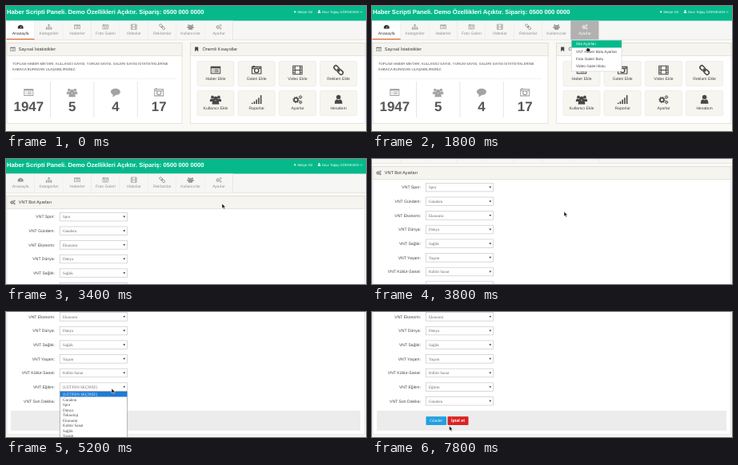
Recreate the animation shown at these times as an HTML page. Size 450 by 157 pixels, loop 8 s.

```html
<!DOCTYPE html>
<html lang="tr">
<head>
<meta charset="utf-8">
<title>Haber Paneli</title>
<style>
html, body { margin: 0; width: 100%; height: 100%; overflow: hidden; background: #fff; }
svg { display: block; }
#stage { width: 100vw; height: 100vh; }
text { font-family: "Liberation Sans", Arial, sans-serif; fill: currentColor; text-rendering: geometricPrecision; white-space: pre; }
.serif { font-family: "Liberation Serif", Times, serif; }
.bold { font-weight: bold; }
.tab { color: #949494; }
.tab .back { fill: #f6f6f5; }
.tab .underline { fill: none; }
.tab.active { color: #333; }
.tab.active .back { fill: #fff; }
.tab.active .underline { fill: #dc6b3c; }
.tab.hover { color: #fff; }
.tab.hover .back { fill: #b1b1b1; }
.row rect { fill: none; }
.row { color: #444; }
.row.on { color: #fff; }
#menu .on rect { fill: #06b98b; }
#list .on rect { fill: #1e7ad6; }
</style>
</head>
<body>
<svg id="stage" viewBox="0 0 450 157" preserveAspectRatio="none"></svg>
<script>
const GREEN = '#06b98b';
const BOT = 'VNT';

// Icons live in a 16 x 16 box and take the current colour.
const line = (d, w = 2) => `<path d="${d}" fill="none" stroke="currentColor" stroke-width="${w}"/>`;
const solid = d => `<path d="${d}" fill="currentColor" fill-rule="evenodd"/>`;
const gear = (x, y, r) => `<g fill="none" stroke="currentColor"><circle cx="${x}" cy="${y}" r="${r}" stroke-width="${r * .7}"/>
  <circle cx="${x}" cy="${y}" r="${r * 1.5}" stroke-width="${r * .5}" stroke-dasharray="${r * .59}"/></g>`;
const person = (x, y, s) => `<g transform="translate(${x} ${y}) scale(${s})" fill="currentColor">
  <circle r="3.2"/><path d="M-5.5 9.5V7Q-5 3.5-2.5 3.2Q0 5 2.5 3.2Q5 3.5 5.5 7V9.5Z"/></g>`;
const icons = {
  gauge: solid('M1 13A7.5 7.5 0 1 1 15 13ZM7 11H9L11 5Z'),
  sitemap: solid('M6 1H10V5H6ZM0 11H4V15H0ZM6 11H10V15H6ZM12 11H16V15H12Z') + line('M8 5V11M2 11V8H14V11', 1.2),
  list: solid('M0 2H16V14H0ZM1.3 5V12.7H14.7V5Z') + line('M3 7H4.5M6 7H13M3 9H4.5M6 9H13M3 11H4.5M6 11H13', 1),
  camera: line('M.7 2.7H15.3V13.8H.7Z', 1.4) + line('M1 5.2H4.8M11.2 5.2H15M2 2H5', 1.8) +
    '<circle cx="8" cy="8.5" r="3.4" fill="none" stroke="currentColor" stroke-width="1.7"/>',
  film: line('M.7 1.2H15.3V14.8H.7ZM4 1V15M12 1V15M4 8H12M1 4.6H4M1 8H4M1 11.4H4M12 4.6H15M12 8H15M12 11.4H15', 1.3),
  link: `<g fill="none" stroke="currentColor" stroke-width="2" transform="rotate(45 8 8)">
    <rect x="-1" y="5" width="9" height="6" rx="3"/><rect x="8" y="5" width="9" height="6" rx="3"/><path d="M5 8H11"/></g>`,
  users: person(3, 4, .75) + person(13, 4, .75) + person(8, 6.2, 1),
  cogs: gear(5.5, 8.5, 3) + gear(12.7, 4, 1.7) + gear(12.7, 12.3, 1.7),
  bars: solid('M0 13H2V15H0ZM3.5 11H5.5V15H3.5ZM7 8H9V15H7ZM10.5 5H12.5V15H10.5ZM14 1H16V15H14Z'),
  user: person(8, 4.3, 1.1),
  comment: solid('M8 1.5C13 1.5 16 4 16 7S13 12.5 8 12.5Q6 15 2.5 15Q4 13 3.5 11.5Q0 10 0 7C0 4 3 1.5 8 1.5Z'),
  bookmark: solid('M3 1H13V15L8 10.5L3 15Z'),
  play: solid('M3 2L14 8L3 14Z')
};

const icon = (name, x, y, size, color = 'currentColor') =>
  `<svg x="${x - size / 2}" y="${y - size / 2}" width="${size}" height="${size}" viewBox="0 0 16 16" overflow="visible" color="${color}">${icons[name]}</svg>`;
const rect = (x, y, w, h, fill, extra = '') =>
  `<rect x="${x}" y="${y}" width="${w}" height="${h}" fill="${fill}" ${extra}/>`;
const text = (s, x, y, size, { color = 'currentColor', anchor = 'start', cls = '' } = {}) =>
  `<text x="${x}" y="${y + size * .35}" font-size="${size}" text-anchor="${anchor}" class="${cls}" color="${color}">${s}</text>`;
const middle = (s, x, y, size, color, cls) => text(s, x, y, size, { color, cls, anchor: 'middle' });
const group = (id, body) => `<g id="${id}">${body}</g>`;

const panel = (x, w, h, iconName, title, iconColor = '#444') =>
  rect(x, 46.5, w, h, '#fff', 'stroke="#dcdbd7" stroke-width=".7"') +
  rect(x, 46.5, w, 16, '#f5f4ef', 'stroke="#dcdbd7" stroke-width=".7"') +
  icon(iconName, x + 7.5, 54.3, 6.5, iconColor) +
  text(title, x + 14.7, 54.3, 5.6, { color: '#3c3c3c' });

const tabs = [['gauge', 'Anasayfa'], ['sitemap', 'Kategoriler'], ['list', 'Haberler'], ['camera', 'Foto Galeri'],
  ['film', 'Videolar'], ['link', 'Reklamlar'], ['users', 'Kullanıcılar'], ['cogs', 'Ayarlar']];

const header =
  rect(0, 0, 450, 18.5, GREEN) +
  text('Haber Scripti Paneli. Demo Özellikleri Açıktır. Sipariş: 0500 000 0000', 1, 7.7, 7.65, { color: '#fff', cls: 'bold' }) +
  icon('play', 361.5, 7.3, 3.6, '#fff') + text('Siteye Git', 364.3, 7.3, 4.3, { color: '#fff' }) +
  icon('user', 391.5, 7, 4.6, '#fff') + text('Onur Toğay GÖRSEVEN', 394.7, 7.3, 4.2, { color: '#fff' }) +
  '<path d="M442.5 6.7L444 8.2L445.5 6.7" fill="none" stroke="#fff" stroke-width=".6"/>' +
  tabs.map(([name, label], i) => {
    const x = .5 + i * 35.4, mid = x + 17.7;
    return `<g class="tab">${rect(x, 18.5, 35.4, 23.7, 'none', 'class="back"')}${rect(x, 41, 35.4, 1.2, 'none', 'class="underline"')}
      ${icon(name, mid, 26.2, 7.5)}${middle(label, mid, 34.1, 5)}</g>` +
      rect(x + 35.1, 18.5, .6, 23.7, '#dedede');
  }).join('');

const stats = [['list', '1947'], ['users', '5'], ['comment', '4'], ['camera', '17']];
const shortcuts = [['list', 'Haber Ekle'], ['camera', 'Galeri Ekle'], ['film', 'Video Ekle'], ['link', 'Reklam Ekle'],
  ['users', 'Kullanıcı Ekle'], ['bars', 'Raporlar'], ['cogs', 'Ayarlar'], ['user', 'Hesabım']];

const home =
  panel(1, 219, 101, 'list', 'Sayısal İstatistikler', '#777') +
  text('TOPLAM HABER MİKTARI, KULLANICI SAYISI, YORUM SAYISI, GALERİ SAYISI İSTATİSTİKLERİNE', 8, 72.3, 4.27, { color: '#555' }) +
  text('KABACA BURADAN ULAŞABİLİRSİNİZ.', 8, 79.8, 4.4, { color: '#555' }) +
  rect(8, 91, 205, .5, '#e4e4e4') +
  stats.map(([name, value], i) => {
    const x = 28.3 + i * 54.3;
    return icon(name, x, 108.5, 12, '#a3a3a3') + middle(value, x, 125.7, 16.9, '#555', 'bold') +
      (i < 3 ? rect(x + 27, 95, .6, 45, '#d5d5d5') : '');
  }).join('') +
  panel(230.7, 218.3, 101, 'bookmark', 'Önemli Kısayollar') +
  shortcuts.map(([name, label], i) => {
    const x = 239 + i % 4 * 51.2, y = i < 4 ? 69.5 : 106.5;
    return rect(x, y, 46, 31, '#f7f5f0', 'rx="1.5" stroke="#e6e4df" stroke-width=".6"') +
      icon(name, x + 23, y + 11, 12.5, '#484848') + middle(label, x + 23, y + 22.2, 5.1, '#444');
  }).join('');

const fields = [['Spor', 'Spor'], ['Gündem', 'Gündem'], ['Ekonomi', 'Ekonomi'], ['Dünya', 'Dünya'], ['Sağlık', 'Sağlık'],
  ['Yaşam', 'Yaşam'], ['Kültür-Sanat', 'Kültür Sanat'], ['Eğitim', ''], ['Son Dakika', 'Gündem']];

const form =
  panel(1, 447.5, 209.5, 'cogs', BOT + ' Bot Ayarları') +
  fields.map(([label, value], i) => {
    const y = 72.6 + i * 17.65;
    return text(`${BOT} ${label}:`, 61, y, 5.1, { color: '#444', anchor: 'end' }) +
      rect(67.3, y - 5.3, 84.2, 10.6, '#fff', 'stroke="#c8c8c8" stroke-width=".7"') +
      (value ? text(value, 71, y, 5, { color: '#666', cls: 'serif' })
        : group('choice', text('[LÜTFEN SEÇİNİZ]', 71, y, 5, { color: '#666', cls: 'serif' }))) +
      `<path d="M146.3 ${y - 1}h3l-1.5 2.2Z" fill="#444"/>`;
  }).join('') +
  rect(6, 226, 437, 25, '#ececec') +
  rect(67.5, 233.2, 25.5, 10.8, '#21a0e0', 'rx=".8"') + middle('Gönder', 80.2, 238.5, 5.3, '#fff', 'serif') +
  rect(94.5, 233.2, 26, 10.8, '#da2222', 'rx=".8"') + middle('İptal et', 107.5, 238.5, 5.3, '#fff', 'bold');

const rows = (labels, x, y, w, pitch, size, indent, cls = '') => labels.map((label, i) =>
  `<g class="row">${rect(x, y + i * pitch, w, pitch, 'none')}${text(label, x + indent, y + (i + .5) * pitch, size, { cls })}</g>`).join('');

const menu = rect(249.5, 42.5, 62.5, 39.5, '#fff', 'stroke="#cfcfcf" stroke-width=".6"') +
  rows(['Site Ayarları', BOT + ' Haber Botu Ayarları', 'Foto Galeri Botu', 'Video Galeri Botu'], 249.5, 43.2, 62.5, 9.15, 4.7, 5.5);

const list = rect(67.3, 99.7, 84.4, 90, '#fff', 'stroke="#999" stroke-width=".7"') +
  rows(['[LÜTFEN SEÇİNİZ]', 'Gündem', 'Spor', 'Dünya', 'Teknoloji', 'Ekonomi', 'Kültür Sanat', 'Sağlık', 'Yaşam'],
    67.6, 100, 83.8, 6.53, 5, 3.5, 'serif');

const outline = 'stroke="#fff" stroke-width=".5" stroke-linejoin="round"';
const cursor =
  `<path id="arrow" d="M0 0V6L1.4 4.8L2.4 7L3.5 6.5L2.5 4.4H4.5Z" fill="#111" ${outline}/>` +
  `<path id="hand" d="M1 .5Q1.7-.3 2.2 .5V2.5L5 3V5.2L4.2 7H1.5L-.5 4.2L.3 3.6L1 4.2Z" fill="#222" ${outline}/>`;

const $ = id => document.getElementById(id);
$('stage').innerHTML = rect(0, 0, 450, 157, '#faf9f4') +
  group('page', rect(0, 18.5, 450, 23.7, '#f6f6f5') + rect(0, 41.9, 450, .6, '#d8d8d8') +
    header + group('home', home) + group('form', form)) +
  group('menu', menu) + group('list', list) + group('cursor', cursor);

// Each step names only what changes; -1 means open with no row lit, null means closed.
const LOOP = 8000;
const steps = [
  [0, { at: null, page: 'home', menu: null, list: null, scroll: 0, choice: '[LÜTFEN SEÇİNİZ]' }],
  [400, { at: [298, 0] }],
  [600, { at: [289, 5] }],
  [800, { at: [279, 10] }],
  [1000, { at: [271, 14] }],
  [1200, { at: [267, 19], menu: -1 }],
  [1400, { at: [266, 23] }],
  [1600, { at: [266, 36] }],
  [1800, { at: [267.5, 50.5], menu: 0 }],
  [2000, { at: [269, 51] }],
  [2200, { at: [270, 55], menu: 1 }],
  [2800, { at: [270, 56], menu: null }],
  [3400, { page: 'form' }],
  [3600, { at: [262, 58], scroll: 16 }],
  [3800, { at: [240, 66], scroll: 37 }],
  [4000, { at: [221, 74], scroll: 60 }],
  [4200, { at: [216, 76], scroll: 81 }],
  [4400, { at: [210, 79], scroll: 102 }],
  [4600, { at: [180, 87] }],
  [4800, { at: [150, 94] }],
  [5000, { at: [132, 96] }],
  [5200, { list: 0 }],
  [5600, { at: [129, 106], list: 1 }],
  [5800, { at: [121, 124], list: 3 }],
  [6000, { at: [112, 142], list: 6 }],
  [6200, { at: null, list: -1 }],
  [7400, { list: null, choice: 'Eğitim' }],
  [7800, { at: [96.5, 143] }]
];

const tabNodes = document.querySelectorAll('.tab');
const choiceText = $('choice').firstChild;
const show = (id, on) => { $(id).style.display = on ? '' : 'none'; };
const openAt = (id, lit) => {
  show(id, lit !== null);
  $(id).querySelectorAll('.row').forEach((row, i) => row.classList.toggle('on', i === lit));
};

function draw(time) {
  const s = Object.assign({}, ...steps.filter(([t]) => t <= time).map(([, change]) => change));
  show('home', s.page === 'home');
  show('form', s.page === 'form');
  $('page').setAttribute('transform', `translate(0 ${-s.scroll})`);
  tabNodes[0].classList.toggle('active', s.page === 'home');
  tabNodes[7].classList.toggle('hover', s.menu !== null);
  openAt('menu', s.menu);
  openAt('list', s.list);
  choiceText.textContent = s.choice;
  show('cursor', s.at);
  show('hand', s.menu !== null);
  show('arrow', s.menu === null);
  if (s.at) $('cursor').setAttribute('transform', `translate(${s.at})`);
}

const start = performance.now();
function tick() {
  draw((performance.now() - start) % LOOP);
  requestAnimationFrame(tick);
}
tick();
</script>
</body>
</html>
```
